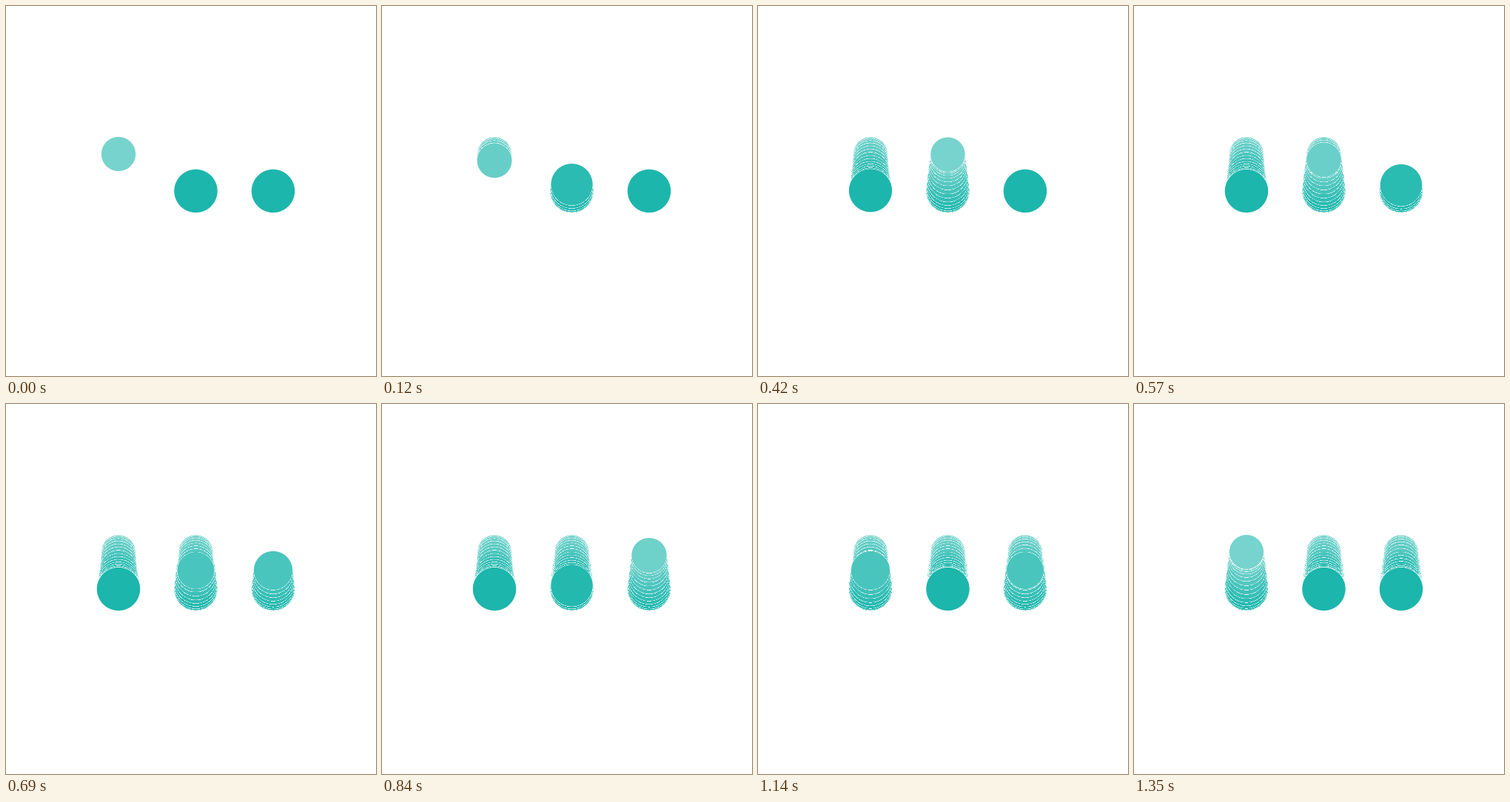
Animation, 500 px wide and 500 px high, one loop 1380 ms. Source, as an HTML page with a canvas:

```html
<!DOCTYPE html>
<html lang="en">
<head>
<meta charset="utf-8">
<title>Bouncing dots</title>
<style>
  html, body { margin: 0; width: 100%; height: 100%; overflow: hidden; background: #fff; }
  canvas { display: block; width: 500px; height: 500px; }
</style>
</head>
<body>
<canvas id="stage" width="500" height="500"></canvas>
<script>
const ctx = document.getElementById('stage').getContext('2d');
const LOOP = 1380, STEP = 30;
const INK = [28, 182, 172];
const LOW = { y: 250, r: 29.2 }, HIGH = { y: 200, r: 23.1 };

// Each dot drops during one phase and rises during the one before it.
const PHASES = [[0, 450], [450, 930], [930, 1350]];
const DOTS = [
  { x: 152, drop: 0, rise: 2 },
  { x: 256.5, drop: 1, rise: 0 },
  { x: 361, drop: 2, rise: 1 }
];

const mix = (a, b, k) => a + (b - a) * k;

function progress(phase, t) {
  const [from, to] = PHASES[phase];
  const k = Math.min(1, Math.max(0, (t - from) / (to - from)));
  return k * k * (3 - 2 * k);
}

function pose(dot, t) {
  const rising = t > PHASES[dot.rise][0] && t <= PHASES[dot.rise][1];
  const dropping = t >= PHASES[dot.drop][0] && t < PHASES[dot.drop][1];
  let low = 1, size = 1;
  if (rising) {
    low = size = 1 - progress(dot.rise, t);
  } else if (dropping) {
    low = progress(dot.drop, t);
    size = Math.pow(low, 1.7);
  }
  return {
    x: dot.x,
    y: mix(HIGH.y, LOW.y, low),
    r: mix(HIGH.r, LOW.r, size),
    alpha: mix(0.6, 1, low)
  };
}

// Opaque disc whose soft edge is blended with white, so stacked discs show pale rims.
function stamp(img, { x, y, r, alpha }) {
  const reach = r + 1;
  for (let py = Math.floor(y - reach); py <= y + reach; py++) {
    for (let px = Math.floor(x - reach); px <= x + reach; px++) {
      const d = Math.hypot(px + 0.5 - x, py + 0.5 - y);
      const cover = Math.min(1, r - d + 0.5);
      if (cover <= 0) continue;
      const i = (py * img.width + px) * 4;
      INK.forEach((c, n) => { img.data[i + n] = mix(255, c, cover * alpha); });
    }
  }
}

function render(step) {
  const img = ctx.createImageData(500, 500);
  img.data.fill(255);
  for (let s = 0; s <= step; s++) {
    for (const dot of DOTS) stamp(img, pose(dot, s * STEP));
  }
  ctx.putImageData(img, 0, 0);
}

let shown = -1;
function tick() {
  const step = Math.floor((performance.now() % LOOP) / STEP);
  if (step !== shown) render(shown = step);
  requestAnimationFrame(tick);
}
tick();
</script>
</body>
</html>
```
